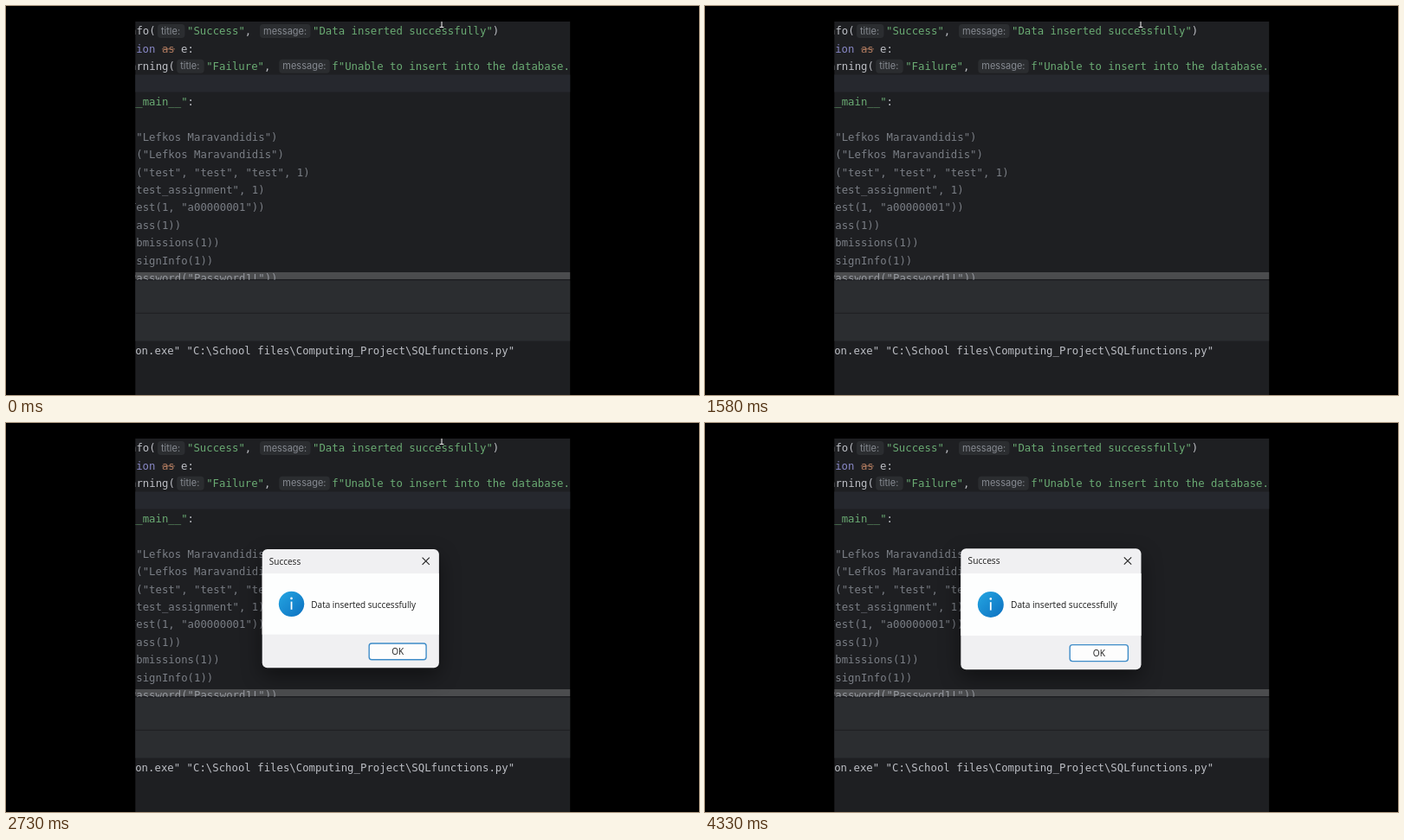
Write an HTML page that moves like this. It is 800x450 px and loops after 4360 ms.

```html
<!DOCTYPE html>
<html lang="en">
<head>
<meta charset="utf-8">
<title>Insert confirmation</title>
<style>
  html, body { margin: 0; width: 100%; height: 100%; overflow: hidden; background: #000; }
  svg { display: block; width: 100vw; height: 100vh; }
  .code { font: 12.33px "DejaVu Sans Mono", monospace; }
  .hint { font: 11px Inter, sans-serif; fill: #868a91; }
  .ui { font: 10.2px "Open Sans", sans-serif; fill: #1c1c1c; }
  #dialog { filter: drop-shadow(0 9px 12px rgba(0, 0, 0, .45)); }
</style>
</head>
<body>
<svg viewBox="0 0 800 450">
  <defs>
    <clipPath id="window"><rect x="149.3" y="18" width="501.9" height="432"/></clipPath>
    <clipPath id="pane"><rect x="149" y="18" width="503" height="299"/></clipPath>
    <linearGradient id="blue" x1="0" y1="0" x2="1" y2="1">
      <stop offset="0" stop-color="#25a6e2"/><stop offset="1" stop-color="#0c70c0"/>
    </linearGradient>
  </defs>
  <rect width="800" height="450"/>
  <g clip-path="url(#window)">
    <rect x="149" y="18" width="503" height="432" fill="#1e1f22"/>
    <rect x="149" y="79.5" width="503" height="20" fill="#26282e"/>
    <g id="editor" clip-path="url(#pane)"></g>
    <rect x="149" y="308" width="503" height="8" fill="#fff" opacity=".2"/>
    <rect x="149" y="317.5" width="503" height="70" fill="#2b2d30"/>
    <rect x="149" y="354.8" width="503" height="1" fill="#1e1f22"/>
    <g id="console"></g>
    <path id="pointer" d="M503 18V24.5M500.6 24.5H505.4" stroke="#e8e8e8" stroke-width="1.1" fill="none"/>
    <g id="dialog">
      <rect x="295.3" y="145.3" width="208.2" height="140" rx="6" fill="#f0f0f2"/>
      <rect x="295.3" y="174" width="208.2" height="72" fill="#fdfefe"/>
      <text class="ui" x="303.6" y="163.3">Success</text>
      <path d="M483.8 155.3l8.4 8.4m0-8.4l-8.4 8.4" stroke="#222" stroke-width="1.1"/>
      <circle cx="329.8" cy="210" r="15" fill="url(#blue)"/>
      <circle cx="329.8" cy="203.4" r="1.3" fill="#fff"/>
      <path d="M329.8 207.2V216.6" stroke="#fff" stroke-width="1.8"/>
      <text class="ui" x="353" y="214.4">Data inserted successfully</text>
      <rect x="421.2" y="256.6" width="67.2" height="19" rx="3" fill="#fdfdfd" stroke="#3e8cc8" stroke-width="1.4"/>
      <text class="ui" x="454.8" y="269.9" text-anchor="middle">OK</text>
    </g>
  </g>
</svg>
<script>
const LOOP = 4360, OPEN = 2595, FADE = 125, POINTER_HIDES = 3540;
const TEXT = '#bcbec4', STRING = '#6aab73', DIM = '#7a7e85';
const $ = id => document.getElementById(id);
const editor = $('editor'), dialog = $('dialog'), pointer = $('pointer');

function add(parent, tag, attrs, content = '') {
  const node = document.createElementNS('http://www.w3.org/2000/svg', tag);
  for (const key in attrs) node.setAttribute(key, attrs[key]);
  node.textContent = content;
  parent.append(node);
}
const baseline = row => 33.4 + 20.4 * row;
const code = (row, x, content, fill = TEXT) =>
  add(editor, 'text', { class: 'code', x, y: baseline(row), fill }, content);

function hint(row, x, width, label) {
  const y = baseline(row);
  add(editor, 'rect', { x, y: y - 12.4, width, height: 16, rx: 4, fill: '#2b2d30' });
  add(editor, 'text', { class: 'hint', x: x + 4, y: y - 0.9 }, label);
}

function call(row, name, title, titleX, message, messageX) {
  code(row, 143, name);
  hint(row, titleX - 34, 31.5, 'title:');
  code(row, titleX, title, STRING);
  code(row, titleX + 66.8, ',');
  hint(row, messageX - 61, 58.5, 'message:');
  code(row, messageX, message, STRING);
}

call(0, 'nfo(', '"Success"', 209, '"Data inserted successfully"', 354);
code(0, 561.7, ')');
code(1, 150.2, 'ion', '#8888c6');
code(1, 179.9, 'as', '#b07a5f');
add(editor, 'path', { d: 'M180 49.8H195', stroke: '#b07a5f', 'stroke-width': 0.8 });
code(1, 202.1, 'e:');
call(2, 'arning(', '"Failure"', 231.2, 'f"Unable to insert into the database.', 376.3);
code(4, 142.8, '__main__"', STRING);
code(4, 209.6, ':');

[
  '("Lefkos Maravandidis")',
  's("Lefkos Maravandidis")',
  't("test", "test", "test", 1)',
  '"test_assignment", 1)',
  'Test(1, "a00000001"))',
  'lass(1))',
  'ubmissions(1))',
  'ssignInfo(1))',
  'Password("Password1!"))'
].forEach((line, i) => code(6 + i, 142.8, line, DIM));

add($('console'), 'text', { class: 'code', x: 149.2, y: 403.2, fill: TEXT },
  'on.exe" "C:\\School files\\Computing_Project\\SQLfunctions.py"');

function draw(t) {
  const age = t - OPEN;
  const scale = t > 2860 ? 1 : 1 - 0.202 * Math.exp(-age / 58);
  dialog.style.display = age > 0 ? '' : 'none';
  dialog.setAttribute('opacity', Math.max(0, Math.min(1, age / FADE)));
  dialog.setAttribute('transform', `translate(317 177) scale(${scale}) translate(-317 -177)`);
  pointer.style.display = t < POINTER_HIDES ? '' : 'none';
}

const start = performance.now();
function tick() {
  draw((performance.now() - start) % LOOP);
  requestAnimationFrame(tick);
}
tick();
</script>
</body>
</html>
```
